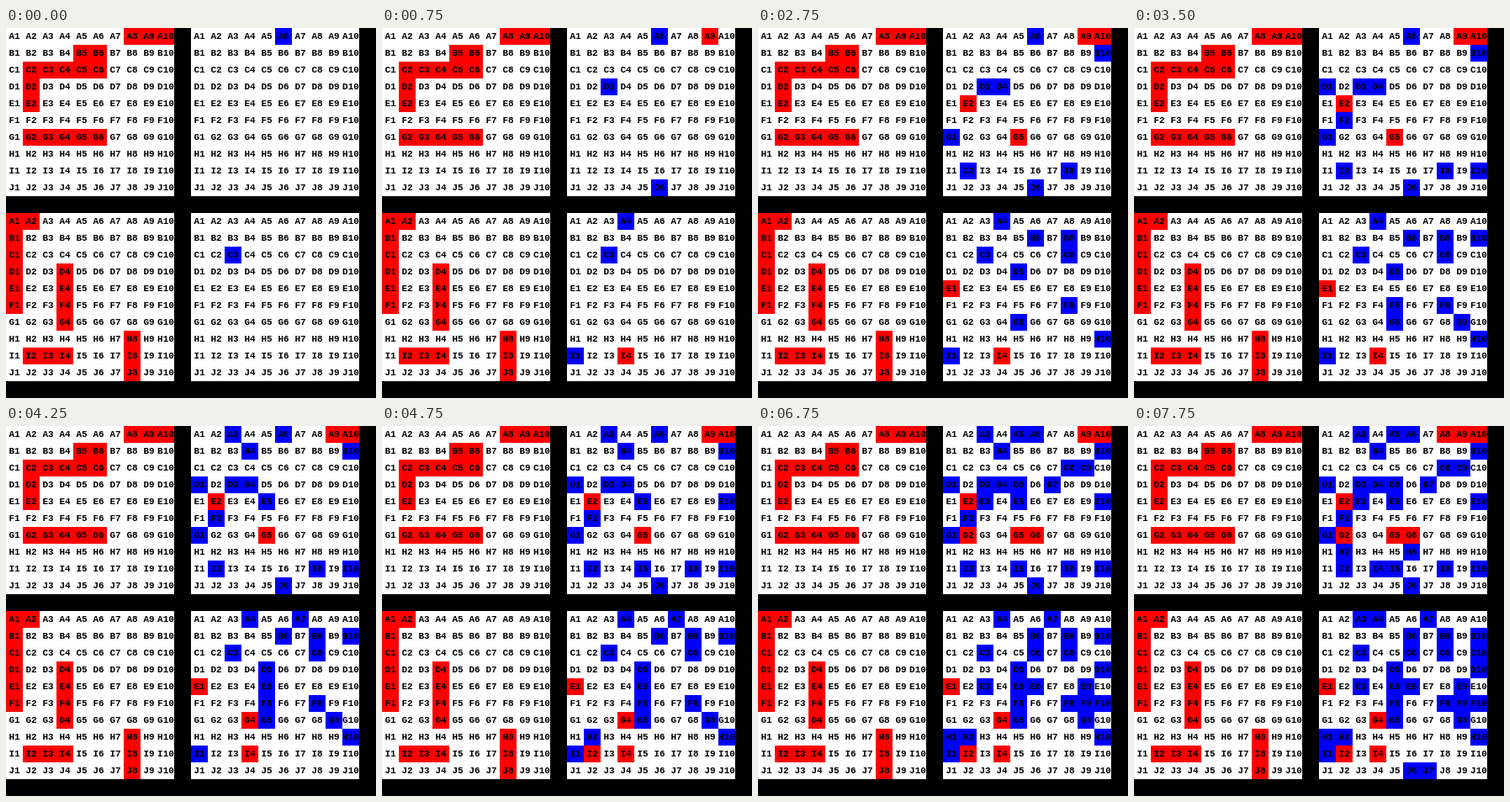
An HTML page for the animation above (8 s loop, 440 by 440 pixels).

```html
<!DOCTYPE html>
<html lang="en">
<head>
<meta charset="utf-8">
<title>Battleship grids</title>
<style>
html, body { margin: 0; width: 100%; height: 100%; overflow: hidden; background: #000; }
svg { display: block; width: 100vw; height: 100vh; }
rect { shape-rendering: crispEdges; }
text { font: bold 11px "Liberation Mono", "Courier New", monospace; text-anchor: middle; }
</style>
</head>
<body>
<svg id="stage" viewBox="0 0 440 440"></svg>
<script>
const NS = "http://www.w3.org/2000/svg";
const stage = document.getElementById("stage");
const STEP = 250, STEPS = 32, CELL = 20;
const RED = "#f00", BLUE = "#00f", WHITE = "#fff";

// Each player has a fleet and the shots fired at it, one per step.
const players = [
  {
    y: 0,
    fleet: "A8 A9 A10 B5 B6 C2 C3 C4 C5 C6 D2 E2 G2 G3 G4 G5 G6",
    shots: "A6 A9 D3 J6 G5 I2 B10 G1 I8 E2 D4 A10 F2 D1 I10 B4 " +
           "E5 A3 E10 I5 G6 C8 A5 G2 D5 E3 D7 C9 A8 I4 H6 H2"
  },
  {
    y: 220,
    fleet: "A1 A2 B1 C1 D1 E1 F1 D4 E4 F4 G4 H8 I8 J8 I2 I3 I4",
    shots: "C3 I4 A4 I1 D5 F8 E1 B8 H10 B6 C8 G5 B10 F5 G9 E5 " +
           "A7 G4 I2 H2 D10 C6 E3 F10 E9 F9 H1 E6 J6 A3 J7 C10"
  }
];

function add(tag, attrs) {
  const node = document.createElementNS(NS, tag);
  for (const key in attrs) node.setAttribute(key, attrs[key]);
  return stage.appendChild(node);
}

function makeBoard(left, top) {
  const cells = {};
  [..."ABCDEFGHIJ"].forEach((letter, row) => {
    for (let col = 0; col < 10; col++) {
      const x = left + col * CELL, y = top + row * CELL;
      const name = letter + (col + 1);
      cells[name] = add("rect", { x, y, width: CELL, height: CELL, fill: WHITE });
      add("text", { x: x + 10, y: y + 13 }).textContent = name;
    }
  });
  return cells;
}

for (const p of players) {
  p.fleet = p.fleet.split(" ");
  p.shots = p.shots.split(" ");
  const home = makeBoard(0, p.y);
  p.fleet.forEach(name => home[name].setAttribute("fill", RED));
  p.radar = makeBoard(220, p.y);
}

function draw(ms) {
  const step = Math.floor(ms / STEP) % STEPS;
  for (const p of players) {
    p.shots.forEach((name, i) => {
      const fill = i > step ? WHITE : p.fleet.includes(name) ? RED : BLUE;
      p.radar[name].setAttribute("fill", fill);
    });
  }
}

const start = performance.now();
function tick() {
  draw(performance.now() - start);
  requestAnimationFrame(tick);
}
tick();
</script>
</body>
</html>
```
